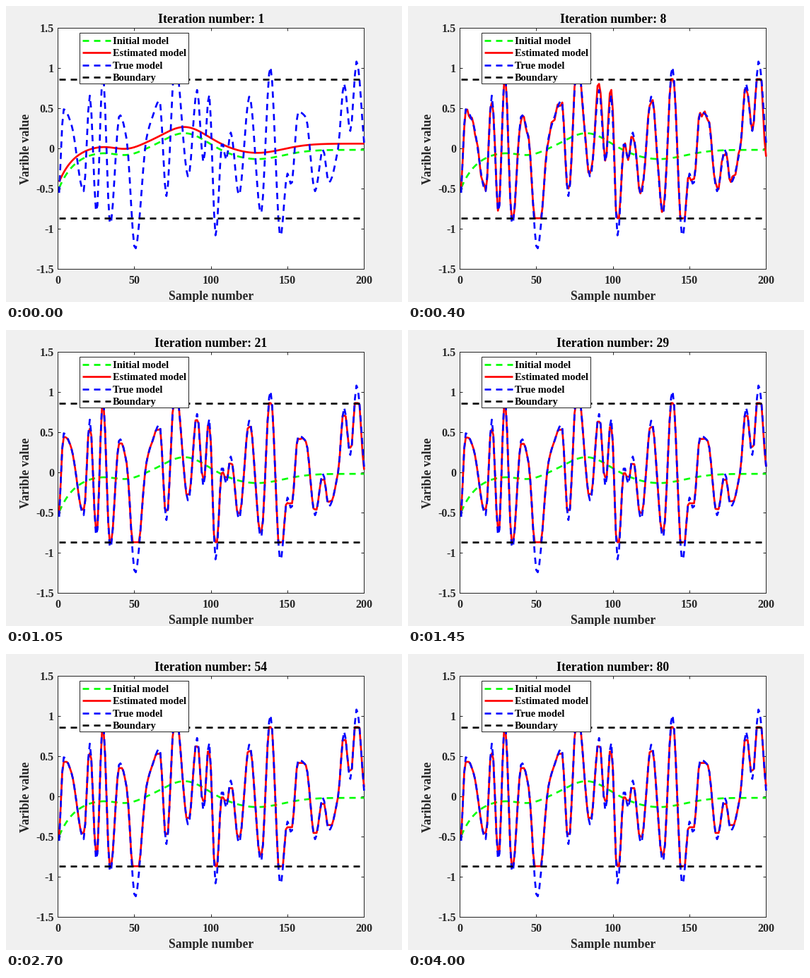
A matplotlib script for the animation above (4.05 s loop, 560 by 420 pixels).

```python
import numpy as np
import matplotlib.pyplot as plt
from matplotlib.animation import FuncAnimation
from matplotlib.patches import Rectangle

W, H, DPI = 560, 420, 80
PX = 72 / DPI
FRAMES, INTERVAL = 81, 50
LIMIT = 0.866
INK = "#262626"
GREEN, RED, BLUE = "#00ff00", "#ff0000", "#0000ff"
LEFT, TOP, AX_W, AX_H = 73, 31.4, 433.4, 342

plt.rcParams["font.family"] = "Liberation Serif"
plt.rcParams["font.weight"] = "bold"

# Turning points of the true model: sample, value
TURNS = [
    (1, -.55), (4, .49), (9, .30), (17, -.53), (21, .66), (25.4, -.81),
    (29.5, .95), (34.3, -.95), (40.5, .42), (45, .12), (50.6, -1.25),
    (58, .13), (62, .40), (66.5, .60), (71, -.59), (76.7, 1.1), (85.3, -.35),
    (91, .73), (95.2, -.17), (98.8, .68), (103.2, -1.09), (107.4, .08),
    (110, -.14), (113, .20), (118.3, -.58), (125.2, .65), (132.7, -.81),
    (138.8, 1.02), (145.4, -1.1), (150, -.31), (152.5, -.45), (157, .46),
    (162, .39), (168, -.53), (173.2, -.01), (177, -.42), (183, 0),
    (187, .81), (191, .22), (195.2, 1.09), (200, .07),
]


def bump(center, width):
    return np.exp(-((x - center) / width) ** 2)


def monotone(x, xk, yk):
    """Cubic Hermite curve through the points without overshoot."""
    h = np.diff(xk)
    d = np.diff(yk) / h
    a, b = d[:-1], d[1:]
    same = a * b > 0
    m = np.zeros(len(xk))
    m[0], m[-1] = d[0], d[-1]
    m[1:-1][same] = 2 * a[same] * b[same] / (a[same] + b[same])
    i = np.clip(np.searchsorted(xk, x, side="right") - 1, 0, len(h) - 1)
    t = (x - xk[i]) / h[i]
    rise = t * t * (3 - 2 * t)
    return (yk[i] * (1 - rise) + yk[i + 1] * rise
            + h[i] * t * (1 - t) * (m[i] * (1 - t) - m[i + 1] * t))


def flatten(y, strength, steps=2000):
    """Total variation smoothing, which cuts the extremes flat."""
    p = np.zeros(len(y) - 1)
    for _ in range(steps):
        u = y + np.diff(p, prepend=0, append=0)
        p = np.clip(p + 0.25 * np.diff(u), -strength, strength)
    return u


x = np.arange(1, 201)
true = monotone(x, *np.array(TURNS).T)
final = flatten(true, 0.06)
initial = (-0.015 - 0.475 * np.exp((1 - x) / 10.5) - 0.06 * bump(45, 12)
           + 0.21 * bump(83, 19) - 0.115 * bump(130, 24))

# Errors of the early iterations that fade away
rough = (0.6 * (true - final) + 0.15 * (bump(91, 2) + bump(98.8, 2))
         + 0.04 * np.sin(1.7 * x))
tail = -0.22 * bump(200, 2.5)


def estimate(n):
    w = 1 - np.exp(-0.7 * (n - 1))
    age = max(n - 8, 0)
    y = final + rough * np.exp(-age / 7) + tail * np.exp(-age / 15)
    return np.clip((initial + 0.077) * (1 - w) + y * w, -LIMIT, LIMIT)


fig = plt.figure(figsize=(W / DPI, H / DPI), dpi=DPI, facecolor="#f0f0f0")
ax = fig.add_axes([LEFT / W, 1 - (TOP + AX_H) / H, AX_W / W, AX_H / H])
ax.set(xlim=(0, 200), ylim=(-1.5, 1.5),
       xticks=range(0, 201, 50), yticks=np.arange(-1.5, 1.6, 0.5))
ax.tick_params(direction="in", length=4.3 * PX, width=PX, color=INK,
               top=True, right=True, labelbottom=False, labelleft=False)
for spine in ax.spines.values():
    spine.set(linewidth=PX, edgecolor=INK)

# Overlay in pixel coordinates for the text and the legend
top = fig.add_axes([0, 0, 1, 1], xlim=(0, W), ylim=(H, 0))
top.axis("off")


def label(px, py, s, size, color=INK, ha="center", rotation=0):
    return top.text(px, py, s, fontsize=size * PX, color=color, ha=ha,
                    va="baseline", rotation=rotation, rotation_mode="anchor")


def style(color, dashed=True):
    width = 2.67
    dash = (0, (9 / width, 7 / width)) if dashed else "-"
    return dict(color=color, lw=width * PX, ls=dash, zorder=3,
                dash_capstyle="butt", solid_capstyle="butt",
                solid_joinstyle="round", clip_on=False)


for v in range(0, 201, 50):
    label(LEFT + v / 200 * AX_W, 394, str(v), 16)
for v in np.arange(-1.5, 1.6, 0.5):
    label(68, TOP + (1.5 - v) / 3 * AX_H + 5.6, f"{v:g}", 16, ha="right")
label(290, 416.6, "Sample number", 17.6)
label(33, 202.5, "Varible value", 17.6, rotation=90)
title = label(290, 24, "", 17.6, color="black")

ax.plot(x, initial, **style(GREEN))
red, = ax.plot(x, initial, **style(RED, False))
ax.plot(x, true, **style(BLUE))
for level in (LIMIT, -LIMIT):
    ax.plot([1, 200], [level, level], **style("black"))

top.add_patch(Rectangle((104, 38), 154, 72, facecolor="white",
                        edgecolor=INK, lw=PX, zorder=2))
entries = [("Initial model", GREEN), ("Estimated model", RED),
           ("True model", BLUE), ("Boundary", "black")]
for row, (name, color) in enumerate(entries):
    y = 49 + 17.3 * row
    top.plot([108, 148], [y, y], **style(color, color != RED))
    label(151, y + 5, name, 14.4, color="black", ha="left")


def update(frame):
    n = max(frame, 1)
    red.set_ydata(estimate(n))
    title.set_text(f"Iteration number: {n}")
    return red, title


anim = FuncAnimation(fig, update, frames=FRAMES, interval=INTERVAL,
                     repeat=True, repeat_delay=0, blit=False)
plt.show()
```
